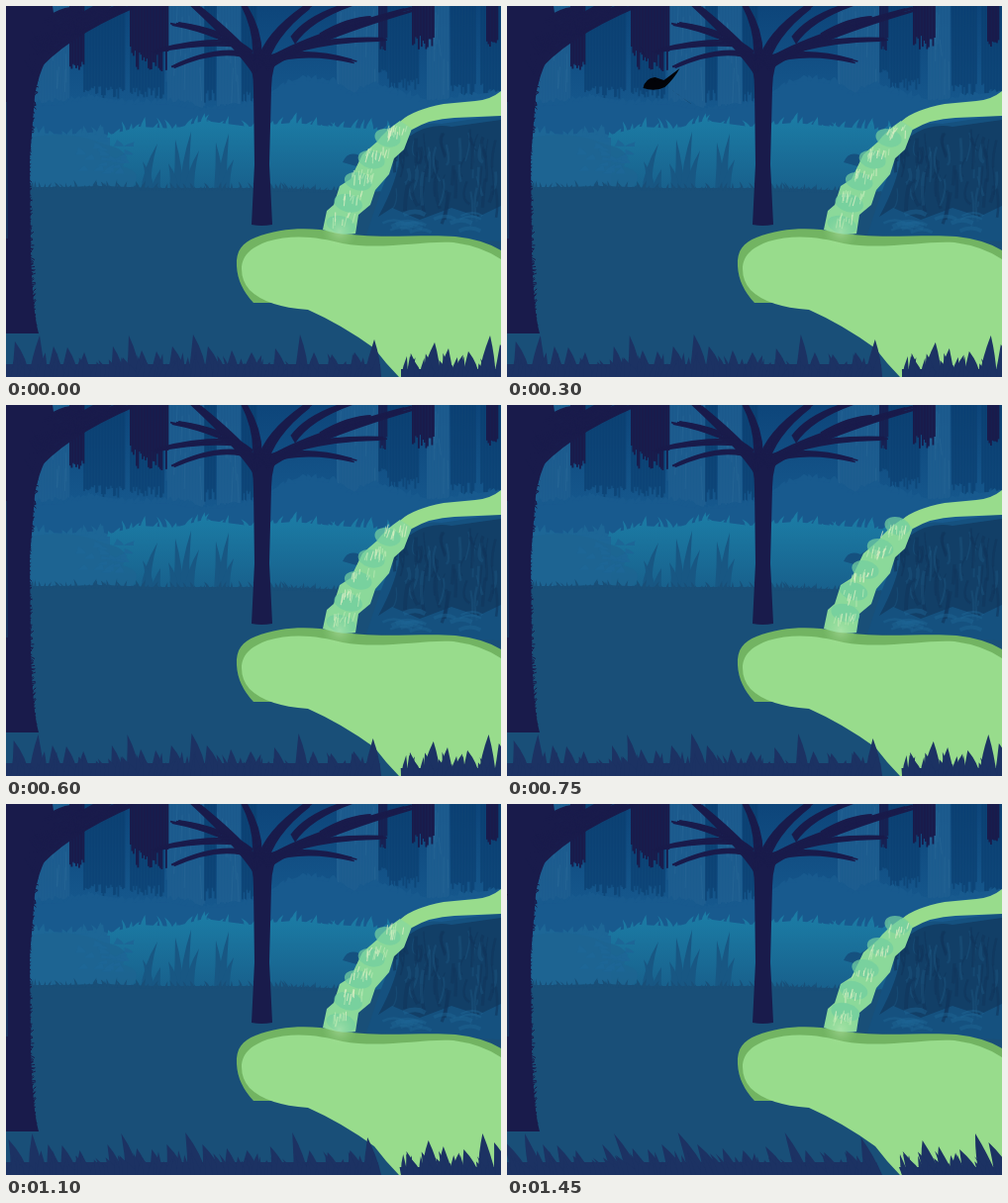
These frames come from a looping animation (500x375 px, 1.5 s). An HTML page with a canvas:

```html
<!DOCTYPE html>
<html lang="en">
<head>
<meta charset="utf-8">
<title>Forest pool</title>
<style>
html, body { margin: 0; width: 100%; height: 100%; overflow: hidden; background: #184f77; }
canvas { display: block; }
</style>
</head>
<body>
<canvas id="stage" width="500" height="375"></canvas>
<script>
const W = 500, H = 375, LOOP = 1500, STEP = 50;
const view = document.getElementById('stage').getContext('2d');
const backdrop = document.createElement('canvas');
backdrop.width = W;
backdrop.height = H;
let c = backdrop.getContext('2d');

let seed = 7;
const rnd = (a = 0, b = 1) => {
  seed = seed * 16807 % 2147483647;
  return a + (b - a) * seed / 2147483647;
};
const mix = (a, b, k) => a + (b - a) * k;

function shape(color, path) {
  c.fillStyle = color;
  c.fill(new Path2D(path));
}

function line(color, width, path) {
  c.strokeStyle = color;
  c.lineWidth = width;
  c.stroke(new Path2D(path));
}

function blade(x, y, h, w, lean) {
  c.beginPath();
  c.moveTo(x - w, y);
  c.quadraticCurveTo(x - w * .6, y - h * .5, x + lean, y - h);
  c.quadraticCurveTo(x + w * .9, y - h * .5, x + w, y);
  c.fill();
}

// Fills below a ridge given as [x, y, x, y, ...] and adds leaves along its top.
function ridge(color, pts, bottom, h, w, gap) {
  c.fillStyle = color;
  c.beginPath();
  c.moveTo(pts[0], bottom);
  for (let i = 0; i < pts.length; i += 2) c.lineTo(pts[i], pts[i + 1]);
  c.lineTo(pts[pts.length - 2], bottom);
  c.fill();
  for (let i = 0; i < pts.length - 2; i += 2)
    for (let x = pts[i]; x < pts[i + 2]; x += gap * rnd(.5, 1.5)) {
      const y = mix(pts[i + 1], pts[i + 3], (x - pts[i]) / (pts[i + 2] - pts[i]));
      blade(x, y + 3, rnd(3, h + 3), w * rnd(.6, 1.2), rnd(-h, h) * .6);
    }
}

// Vertical dry-brush column with a ragged lower end.
function column(color, x, w, y, alpha = 1, ragged = 14) {
  c.fillStyle = color;
  c.globalAlpha = alpha;
  for (let i = 0; i < w; i += 1.5) c.fillRect(x + i, 0, 1.8, y - rnd(0, ragged));
  c.globalAlpha = 1;
}

// Tapered bristle stroke along a quadratic curve.
function branch(x0, y0, cx, cy, x1, y1, w) {
  const d = Math.hypot(x1 - x0, y1 - y0), nx = (y0 - y1) / d, ny = (x1 - x0) / d;
  for (let i = -w / 2; i <= w / 2; i += 1.2) {
    const k = rnd(.82, 1), s = i * .45;
    const ex = mix(cx, x1, k) + nx * s, ey = mix(cy, y1, k) + ny * s;
    line('#191b4b', 1.7, `M${x0 + nx * i} ${y0 + ny * i}Q${cx + nx * i * .8} ${cy + ny * i * .8} ${ex} ${ey}`);
  }
}

function paintForest() {
  const sky = c.createLinearGradient(0, 0, 0, 120);
  sky.addColorStop(0, '#0d457a');
  sky.addColorStop(1, '#175b90');
  c.fillStyle = sky;
  c.fillRect(0, 0, W, H);

  for (const [x, w] of [[28, 35], [163, 37], [213, 24], [334, 42], [425, 22]]) {
    column('#205f92', x, w, 112, .8);
    for (let i = 0; i < 8; i++) {
      const sx = x + rnd(0, w), sy = rnd(0, 70);
      line('#34739d66', .8, `M${sx} ${sy}l${rnd(-2, 2)} ${rnd(15, 40)}`);
    }
  }
  for (const [x, w, y] of [[78, 42, 95], [125, 34, 95], [200, 12, 98], [238, 14, 98], [376, 10, 75], [387, 30, 86], [449, 25, 92], [479, 21, 92]])
    column('#0b3f70', x, w, y, .65);
  column('#191b4b', 64, 14, 70);
  column('#191b4b', 125, 39, 66, 1, 26);
  column('#191b4b', 410, 22, 44);
  column('#191b4b', 376, 8, 50, .8, 20);
  column('#191b4b', 485, 12, 48);

  ridge('#185a8e', [20, 99, 55, 97, 85, 91, 125, 97, 165, 96, 200, 103, 255, 97, 278, 80, 300, 72, 330, 76, 352, 88, 372, 78, 400, 88, 430, 96, 500, 86], 190, 5, 5, 6);
  ridge('#1d6696', [0, 130, 30, 128, 60, 130, 95, 127, 120, 139, 132, 160, 160, 170], 190, 8, 4, 7);
  const glow = c.createLinearGradient(0, 115, 0, 190);
  glow.addColorStop(0, '#1b7ba4');
  glow.addColorStop(1, '#185f8b');
  ridge(glow, [105, 130, 135, 122, 170, 124, 200, 116, 245, 122, 290, 118, 330, 122, 365, 124, 405, 128], 195, 11, 3, 6);
  shape('#1d6492cc', 'M0 140Q55 120 100 140Q128 145 118 162Q145 170 120 190H0Z');
  c.fillStyle = '#1d6696';
  for (let i = 0; i < 22; i++) blade(rnd(70, 125), rnd(135, 170), rnd(3, 9), 5, rnd(-7, 7));

  c.fillStyle = '#185783';
  for (const [x, h, lean] of [[141, 50, 12], [145, 32, -7], [151, 24, 5], [174, 54, -3], [180, 62, 7], [185, 43, 10], [170, 30, -6], [215, 51, -3], [218, 60, 7], [221, 34, 9]])
    blade(x, 189, h, 5, lean);
  ridge('#194f78', [0, 183, 50, 183, 100, 182, 150, 184, 200, 184, 250, 184, 300, 185, 350, 187, 500, 190], H, 7, 2, 3.5);

  shape('#15517f', 'M340 158Q345 146 357 151L384 133Q411 116 440 119L500 110V238L364 231Q377 191 385 171Z');
  shape('#123f67', 'M407 132Q427 118 450 122L500 115V202L477 213L450 204L418 216L390 204L376 213Q397 174 397 151Z');
  for (let i = 0; i < 65; i++) {
    const x = rnd(391, 496), y = rnd(123, 190);
    line(i % 3 ? '#10365b99' : '#1d598466', rnd(1, 4), `M${x} ${y}q${rnd(-8, 5)} ${rnd(5, 20)} ${rnd(-5, 5)} ${rnd(14, 36)}`);
  }
  for (let i = 0; i < 14; i++)
    line('#1e649477', rnd(2, 5), `M${rnd(368, 485)} ${rnd(210, 229)}q12 -6 22 0`);

  shape('#191b4b', 'M0 0H47L52 35Q33 62 29 92L24 155L25 250Q27 310 33 331H0Z');
  for (let y = 58; y < 328; y += 2) {
    const edge = y < 150 ? mix(33, 24, (y - 58) / 92) : mix(23, 30, (y - 150) / 178);
    line('#191b4b', 1, `M${edge - 3} ${y}l${rnd(2, 5)} ${rnd(-5, 5)}`);
  }
  line('#18436c99', 2, 'M0 97L1 235');
  branch(23, 63, 53, 27, 133, -4, 17);
  branch(28, 43, 65, 23, 108, -6, 18);
  branch(32, 35, 54, 8, 78, 5, 22);

  shape('#191b4b', 'M242 45Q258 55 279 45Q268 61 268 83L266 160L269 221Q258 223 248 221L251 160L250 85Q250 61 242 45Z');
  branch(255, 65, 236, 38, 186, -5, 12);
  branch(248, 49, 221, 26, 166, 17, 8);
  branch(251, 52, 217, 39, 166, 63, 5);
  branch(235, 38, 194, 35, 146, 47, 6);
  branch(254, 54, 256, 25, 238, -5, 9);
  branch(259, 60, 266, 29, 313, -5, 12);
  branch(262, 61, 297, 35, 414, 2, 10);
  branch(267, 55, 301, 43, 355, 57, 6);
  branch(293, 43, 334, 33, 386, 34, 6);
  branch(290, 35, 306, 12, 355, -4, 8);
  branch(318, 31, 345, 14, 370, 12, 6);

  shape('#72b462', 'M233 263C232 247 239 239 252 234C279 223 309 224 332 228C371 237 417 230 454 233Q482 236 500 247V300H250Q234 283 233 263Z');
  shape('#98dc8c', 'M238 266C238 251 250 243 264 238C291 230 317 234 340 240C380 247 422 237 452 239Q481 243 500 256V375H397Q384 362 372 346Q339 322 305 307Q263 304 246 287Q238 278 238 266Z');
  shape('#98dc8c', 'M500 86Q489 95 474 96L442 99Q411 105 399 116L397 126L410 125Q428 114 453 113L500 111Z');
}

// Centre of the falling water at k from 0 (lip) to 1 (pool).
const fallX = k => mix(397, 336, k) - 9 * Math.sin(Math.PI * k);
const fallY = k => mix(119, 229, k);

function paintFall(t) {
  const phase = t / 100 % 1, n = 5;
  seed = 101 + t;
  shape('#8bd99a', 'M398 116Q383 126 375 137L360 150L348 175L337 182L331 201L324 207L320 226Q337 232 353 230L356 211L368 201L373 186L387 170L392 154L402 145L410 124Z');
  for (let i = -1; i < n; i++) {
    const k = (i + phase + .65) / n;
    if (k < 0 || k > .98) continue;
    c.save();
    c.translate(fallX(k), fallY(k));
    c.rotate(.25);
    c.scale(13 + k * 2, 9);
    c.beginPath();
    c.arc(0, 0, 1, 0, 7);
    c.fillStyle = '#72cea0bb';
    c.fill();
    c.restore();
  }
  for (let i = 0; i < 65; i++) {
    const band = Math.floor(rnd(0, n)), k = Math.min(.94, (band + .05 + rnd(0, .35)) / n);
    const x = fallX(k) + rnd(-11, 11), y = fallY(k);
    line(i % 3 ? '#c5edb999' : '#e0efc5bb', 1.1, `M${x} ${y}l${rnd(-3, 0)} ${rnd(4, 11)}`);
  }
  const foam = c.createRadialGradient(337, 228, 0, 337, 228, 18);
  foam.addColorStop(0, '#c6edb677');
  foam.addColorStop(1, '#98dc8c00');
  c.fillStyle = foam;
  c.fillRect(318, 212, 38, 32);
}

// Blade tips: x, y.
const tips = [9, 339, 34, 333, 48, 344, 62, 345, 79, 350, 108, 344, 124, 333, 137, 348, 152, 349,
  168, 344, 189, 332, 204, 344, 228, 348, 248, 350, 272, 346, 297, 332, 311, 350, 329, 352,
  352, 350, 372, 337, 408, 354, 433, 340, 447, 346, 467, 349, 489, 333, 499, 342];

function paintGrass(t) {
  const lean = 16 * (t / 1450) ** 2.7 / 42;
  seed = 29;
  c.save();
  c.transform(1, 0, lean, 1, -lean * H, 0);
  c.fillStyle = '#1c3263';
  c.fillRect(-20, 362, 398, 14);
  c.fillRect(399, 367, 125, 9);
  for (let i = 0; i < tips.length; i += 2) {
    const lift = rnd(-5, 4);
    blade(tips[i] - lift, 376, 376 - tips[i + 1], rnd(7, 10), lift);
  }
  for (let x = -8; x < 520; x += rnd(3, 7)) {
    const h = rnd(11, 26), w = rnd(3, 6), tilt = rnd(-6, 6);
    if (x < 376 || x > 401) blade(x, 376, h, w, tilt);
  }
  c.restore();
}

function wing(x, y, degrees, flex) {
  c.save();
  c.translate(x, y);
  c.rotate(degrees * Math.PI / 180);
  c.scale(1, flex);
  shape('#020308', 'M-4 -4C8 -1 17 -2 34 -4Q37 5 29 9Q12 11 -4 4Z');
  c.restore();
}

function paintBird(t) {
  const flap = (1 - Math.cos((t - 200) / 200 * 3 * Math.PI)) / 2;
  let x = 300 - (t - 200) * 1.365 - 9, y = 71 + (t - 200) * .05;
  if (t > 450) {
    // Hovers just outside the left edge.
    x = -21 + 2 * Math.cos((t - 1450) / 125 * Math.PI);
    y = 104;
  }
  c.save();
  c.translate(x, y);
  shape('#020308', 'M-17 7Q-15 -3 -5 -4L4 -1L20 -13Q14 -2 5 6Q-5 11 -17 7Z');
  if (t <= 450) {
    wing(-6, -2, mix(-90, -133, flap), mix(-1, 1, flap));
    wing(4, 3, mix(6, 66, flap), mix(1, -1, flap));
  }
  c.restore();
}

paintForest();
c = view;

function frame(now) {
  const t = Math.floor(now % LOOP / STEP) * STEP;
  c.drawImage(backdrop, 0, 0);
  paintFall(t);
  paintGrass(t);
  paintBird(t);
  requestAnimationFrame(frame);
}
frame(0);
</script>
</body>
</html>
```
